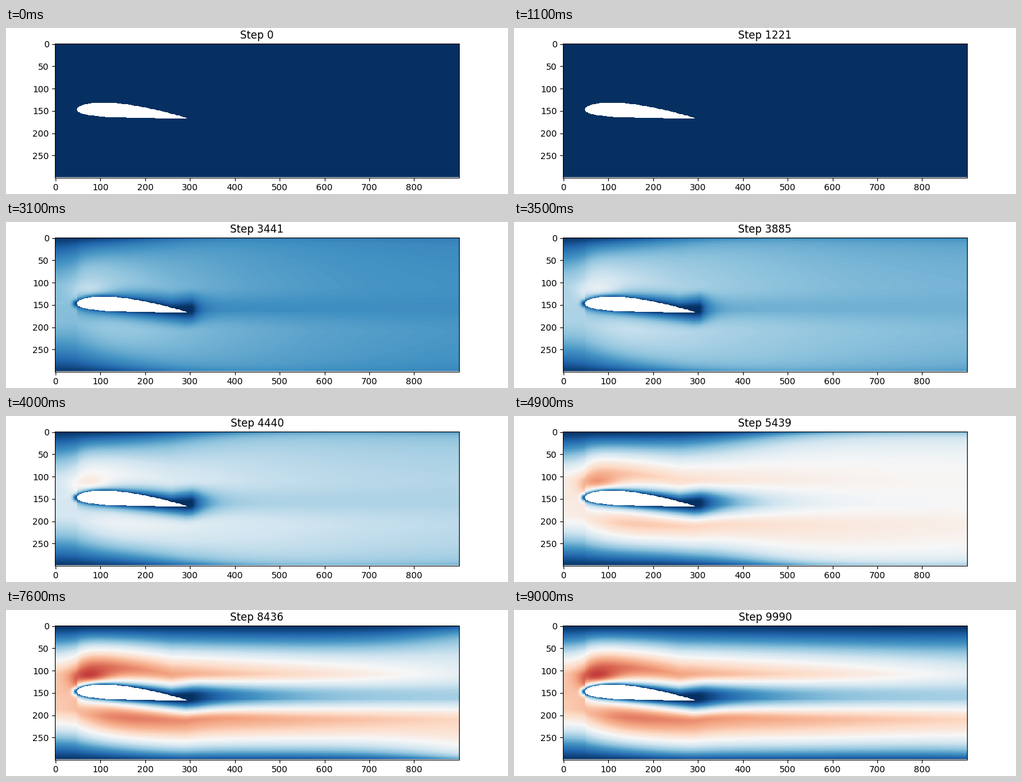
These frames come from a looping animation (800 px wide and 266 px high, 9100 ms). A matplotlib script:

```python
import numpy as np
import matplotlib.pyplot as plt
from matplotlib.animation import FuncAnimation

W, H = 900, 300
FRAMES, INTERVAL, STEPS = 91, 100, 111
LE_X, LE_Y, TE_X, TE_Y = 48.5, 147, 293, 166
CHORD = TE_X - LE_X
WAKE_Y = 156


def smooth(s):
    s = np.clip(s, 0, 1)
    return s * s * (3 - 2 * s)


def sigmoid(s):
    return 1 / (1 + np.exp(-s))


x = np.arange(W, dtype=float)
y = np.arange(H, dtype=float)[:, None]

# Cambered wing section
c = np.clip((x - LE_X) / CHORD, 0, 1)
on_wing = (x >= LE_X) & (x <= TE_X)
half = CHORD * .65 * (.2969 * np.sqrt(c) - .126 * c - .3516 * c**2
                      + .2843 * c**3 - .1015 * c**4)
half = np.where(on_wing, half, 0)
camber = CHORD * .022 * np.where(c < .4, (.8 * c - c**2) / .16,
                                 (.2 + .8 * c - c**2) / .36)
line = LE_Y + (TE_Y - LE_Y) * c - camber
blank = on_wing & (np.abs(y - line) < half)
blank[-1] = True

# Edges of the slow region: the wing surface, then the wake behind it
behind = np.maximum(x - TE_X, 0)
top = np.minimum(line - half, WAKE_Y)
bottom = np.where(x > TE_X, WAKE_Y + (TE_Y - WAKE_Y) * np.exp(-behind / 50),
                  line + half)

# Fixed shapes of the flow
gap_up = 40 + 10 * smooth((x - 100) / 200)
gap_low = 40 + 15 * smooth(x / 600)
skin = .33 + .67 * np.clip((x - LE_X) / 270, 0, 1)**2
boost_up = .2 * sigmoid((x - 45) / 15) * np.exp(-np.maximum(x - 60, 0) / 260)
boost_low = .17 * sigmoid((x - 90) / 30) * np.exp(-np.maximum(x - 100, 0) / 500)
suction = .14 * np.exp(-((x - 82) / 45)**2 - ((y - 117) / 17)**2)
nose = 1 - .9 * np.exp(-((x - LE_X + 1)**2 + (y - LE_Y)**2) / 64)


def side(d, surface, gap, peak, core, power, layer):
    """Speed at distance d from a wall: up to the peak, down to the surface."""
    crest = surface - gap
    s = np.clip(d / crest, 0, 1) ** power
    t = np.clip((surface - d) / gap, 0, 1) ** layer
    return np.where(d < crest, peak * (s + smooth(s)) / 2,
                    core + (peak - core) * smooth(t))


def flow(t):
    """Speed field at t seconds."""
    ramp = np.clip((t - 2) / 3.6, 0, 1)
    near = ramp + .22 * (1 - ramp) * min(1, 12 * ramp)
    age = smooth((t - 6) / 1.6)

    # Wall layers thicken behind a front that moves downstream
    front = 120 + 950 * np.clip((t - 3.5) / 5.5, 0, 1)
    thin = .05 + .12 * ramp
    power = thin + .75 * sigmoid((front - x) / 90)

    level = .62 * (ramp + (near - ramp) * np.exp(-x / 300))
    sag = age * (x / W)**2
    recover = 20 + 140 * smooth((t - 3.5) / 2.5)
    wake = (.62 * ramp - .28 * age) * (1 - np.exp(-np.maximum(x - 305, 0) / recover))
    core = np.where(x < LE_X, .65 * near, wake)
    layer = skin * (.7 + .3 * ramp)

    above = side(y, top, gap_up, level + near * boost_up - .17 * sag,
                 core, power, layer)
    below = side(H - y, H - bottom, gap_low, level + near * boost_low - .05 * sag,
                 core, power * (1 - .35 * age * smooth(x / 300)), layer)
    hot = near * suction * smooth((top - y) / 12)
    return (np.where(y < line, above, below) + hot) * nose


def field(frame):
    return np.ma.array(flow(frame * INTERVAL / 1000), mask=blank)


fig = plt.figure(figsize=(8, 2.66), dpi=100)
ax = fig.add_axes([78.4 / 800, 26.3 / 266, 643.2 / 800, 214.4 / 266])
image = ax.imshow(field(0), cmap="RdBu_r", vmin=0, vmax=1, aspect="auto",
                  interpolation="nearest")
ax.set_xticks(range(0, W, 100))
ax.set_yticks(range(0, H, 50))
title = ax.set_title("Step 0")


def update(frame):
    image.set_data(field(frame))
    title.set_text(f"Step {frame * STEPS}")
    return image, title


anim = FuncAnimation(fig, update, frames=FRAMES, interval=INTERVAL,
                     repeat=True, repeat_delay=0, blit=False)
plt.show()
```
